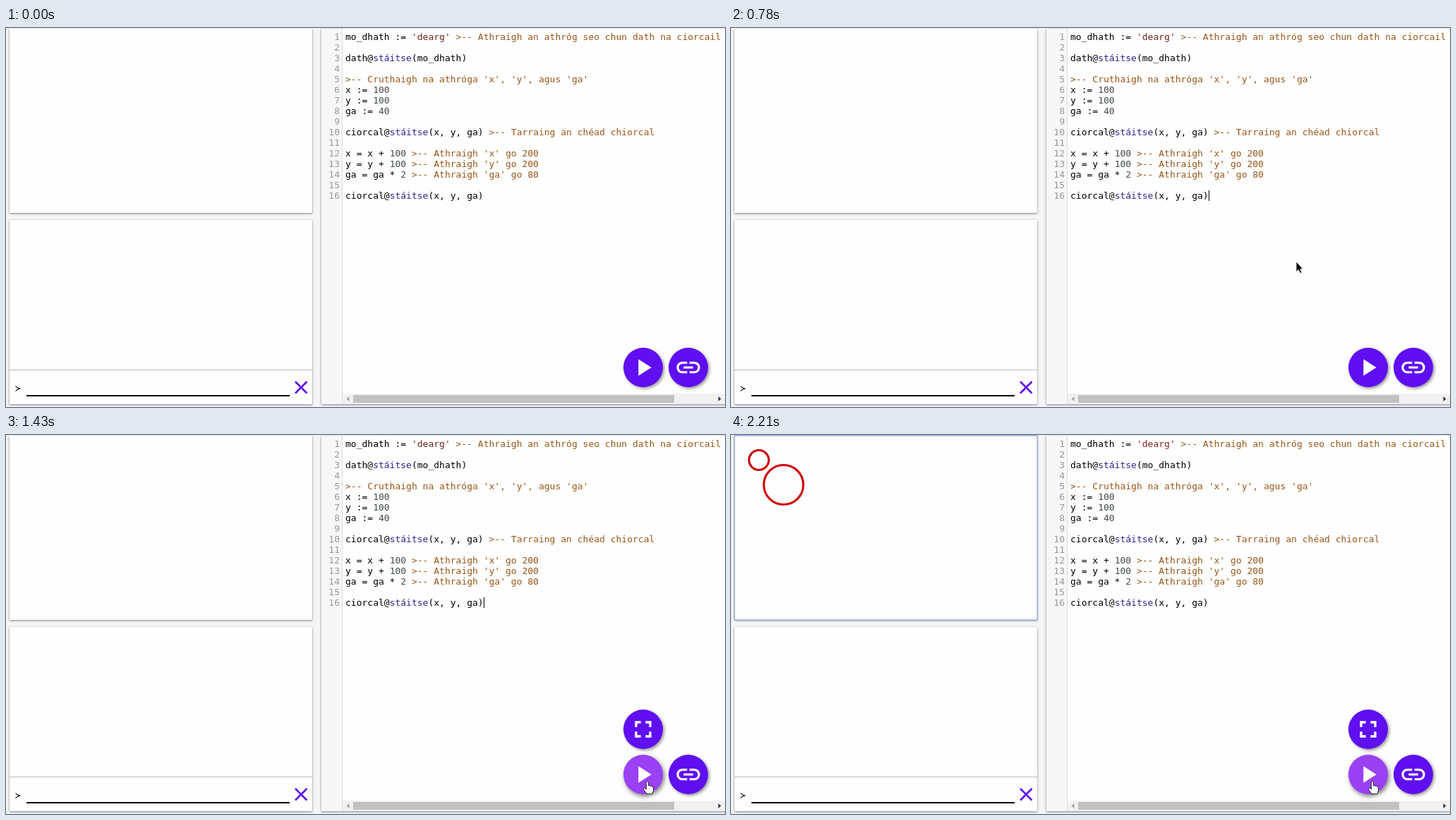
Write an HTML page that moves like this. It is 1019 px wide and 537 px high and loops after 3120 ms.

```html
<!DOCTYPE html>
<html lang="ga">
<head>
<meta charset="utf-8">
<title>Ciorcail</title>
<style>
html, body { margin: 0; width: 100%; height: 100%; overflow: hidden; background: #f5f5f5; }
svg { display: block; width: 1019px; height: 537px; }
text { font: 13px "DejaVu Sans Mono", monospace; white-space: pre; }
.panel { fill: #fefefe; filter: drop-shadow(0 1px 1.5px rgba(0,0,0,.5)); }
.num { fill: #999; text-anchor: end; }
.com { fill: #985618; }
.str { fill: #6c2018; }
.val { fill: #444c48; }
.obj { fill: #341f8e; }
.fab { fill: #5f0ff2; filter: drop-shadow(2px 2px 2px rgba(0,0,0,.42)); }
.line { fill: none; stroke: #fff; }
</style>
</head>
<body>
<svg viewBox="0 0 1019 537">
  <rect class="panel" x="5" y="1" width="429" height="261" rx="1"/>
  <rect class="panel" x="5" y="272" width="429" height="261" rx="1"/>
  <rect class="panel" x="447" y="1" width="580" height="532" rx="1"/>

  <g id="drawing" fill="none">
    <rect x="4.75" y=".75" width="429.5" height="261.5" rx="1.5" stroke="#93a9dd" stroke-width="1.5"/>
    <g stroke="#d0060c" stroke-width="3.1">
      <circle cx="39.5" cy="35.5" r="14"/>
      <circle cx="74.5" cy="70.5" r="28"/>
    </g>
  </g>

  <rect x="5" y="484" width="429" height="1" fill="#bbb"/>
  <text x="13" y="515">≻</text>
  <rect x="29" y="520" width="373" height="2"/>
  <path d="M410 501L426.500 517.500M426.500 501L410 517.500" stroke="#5f0ff2" stroke-width="2.600"/>

  <rect x="447" y="1" width="29" height="532" fill="#f7f7f7"/>
  <rect x="476" y="1" width="1" height="532" fill="#ddd"/>
  <g id="code"></g>
  <rect id="caret" x="677" y="230" width="1" height="15"/>

  <rect x="477" y="518" width="542" height="15" fill="#f1f1f1"/>
  <rect x="492" y="520" width="455" height="11" fill="#c1c1c1"/>
  <path d="M486.500 522v7l-4-3.500z" fill="#a3a3a3"/>
  <path d="M1009.500 522v7l4-3.500z" fill="#333a50"/>

  <g id="full" transform="translate(903 417)">
    <circle class="fab" r="28"/>
    <path class="line" transform="scale(1.667) translate(-12 -12)" stroke-width="2"
      d="M6 10V6h4M14 6h4v4M18 14v4h-4M10 18H6v-4"/>
  </g>
  <g transform="translate(967 481)">
    <circle class="fab" r="28"/>
    <path class="line" transform="scale(1.667) translate(-12 -12)" stroke-width="1.900"
      d="M11 7.950H7a4.050 4.050 0 0 0 0 8.100h4M13 7.950h4a4.050 4.050 0 0 1 0 8.100h-4M8 12h8"/>
  </g>
  <g transform="translate(903 481)">
    <circle class="fab" id="play" r="28"/>
    <path d="M-6.700 -11.700V11.700L11.700 0z" fill="#fff"/>
    <circle id="ripple"/>
  </g>

  <path id="arrow" stroke="#fff" stroke-width="1" stroke-opacity=".85"
    d="M0 0V14.500L3.200 11.600L5.500 16.600L8 15.400L5.700 10.600H9.800Z"/>
  <path id="hand" fill="#fff" stroke="#222" stroke-width="1" stroke-linejoin="round"
    d="M-1.700 1.500a1.700 1.700 0 0 1 3.400 0V6q1.500-.8 2.700.5q1.500-.6 2.400.7q1.700-.2 1.700 1.800V12.500L7 17.500H-1L-5.200 11.500q-.9-1.700.6-2.200q1.200-.2 2.900 1.700Z"/>
</svg>
<script>
const STEP = 130, LOOP = 3120;
const el = id => document.getElementById(id);

// Prefixes after "|": c comment, s string, n number, o object
const source = [
  "mo_dhath := |s'dearg'| |c>-- Athraigh an athróg seo chun dath na ciorcail",
  "",
  "dath@|ostáitse|(mo_dhath)",
  "",
  "|c>-- Cruthaigh na athróga 'x', 'y', agus 'ga'",
  "x := |n100",
  "y := |n100",
  "ga := |n40",
  "",
  "ciorcal@|ostáitse|(x, y, ga) |c>-- Tarraing an chéad chiorcal",
  "",
  "x = x + |n100| |c>-- Athraigh 'x' go 200",
  "y = y + |n100| |c>-- Athraigh 'y' go 200",
  "ga = ga * |n2| |c>-- Athraigh 'ga' go 80",
  "",
  "ciorcal@|ostáitse|(x, y, ga)"
];
const kinds = { c: "com", s: "str", n: "val", o: "obj" };

function add(parent, tag, attrs, content) {
  const node = document.createElementNS("http://www.w3.org/2000/svg", tag);
  for (const k in attrs) node.setAttribute(k, attrs[k]);
  if (content) node.textContent = content;
  return parent.appendChild(node);
}

source.forEach((line, i) => {
  const y = 17 + 15 * i;
  add(el("code"), "text", { class: "num", x: 473, y }, String(i + 1));
  const row = add(el("code"), "text", { x: 481, y });
  line.split("|").forEach((part, j) => {
    const kind = j && kinds[part[0]];
    add(row, "tspan", kind ? { class: kind } : {}, kind ? part.slice(1) : part);
  });
});
const string = document.querySelector(".str");

// Pointer path: time, x, y
const path = [
  [520, 790, 320], [650, 795, 325], [780, 801, 331], [910, 828, 366],
  [1040, 863, 418], [1170, 890, 457], [1300, 905, 485], [1430, 909, 491]
];

function pointer(t) {
  const i = path.findIndex(p => p[0] > t);
  if (i < 0) return path[path.length - 1].slice(1);
  if (i === 0) return path[0].slice(1);
  const [a, b] = [path[i - 1], path[i]];
  const k = (t - a[0]) / (b[0] - a[0]);
  return [a[1] + (b[1] - a[1]) * k, a[2] + (b[2] - a[2]) * k];
}

const clamp = v => Math.max(0, Math.min(1, v));
const show = (id, on) => el(id).setAttribute("visibility", on ? "visible" : "hidden");
const mix = (a, b, k) => a.map((v, i) => Math.round(v + (b[i] - v) * k));

function draw(t) {
  const at = `translate(${pointer(t)})`;
  el("arrow").setAttribute("transform", at);
  el("hand").setAttribute("transform", at);
  show("arrow", t >= 520 && t < 1300);
  show("hand", t >= 1300);
  show("caret", (t >= 390 && t < 910) || (t >= 1430 && t < 1690));
  show("full", t >= 1170);
  show("drawing", t >= 1820);

  const hover = clamp((t - 1170) / 260);
  el("play").style.fill = `rgb(${mix([95, 15, 242], [154, 64, 245], hover)})`;
  el("play").style.filter =
    `drop-shadow(2px ${2 + hover}px ${2 + hover}px rgba(0,0,0,${0.42 + 0.1 * hover}))`;

  const grow = clamp((t - 1670) / 240), fade = 1 - clamp((t - 1950) / 260);
  el("ripple").setAttribute("r", 28 * grow);
  el("ripple").setAttribute("opacity", 0.1 * fade);
  string.style.fill = t >= 2210 ? "#8f1c1c" : "";
}

const start = performance.now();
function tick() {
  const t = (performance.now() - start) % LOOP;
  draw(Math.floor(t / STEP) * STEP);
  requestAnimationFrame(tick);
}
tick();
</script>
</body>
</html>
```
